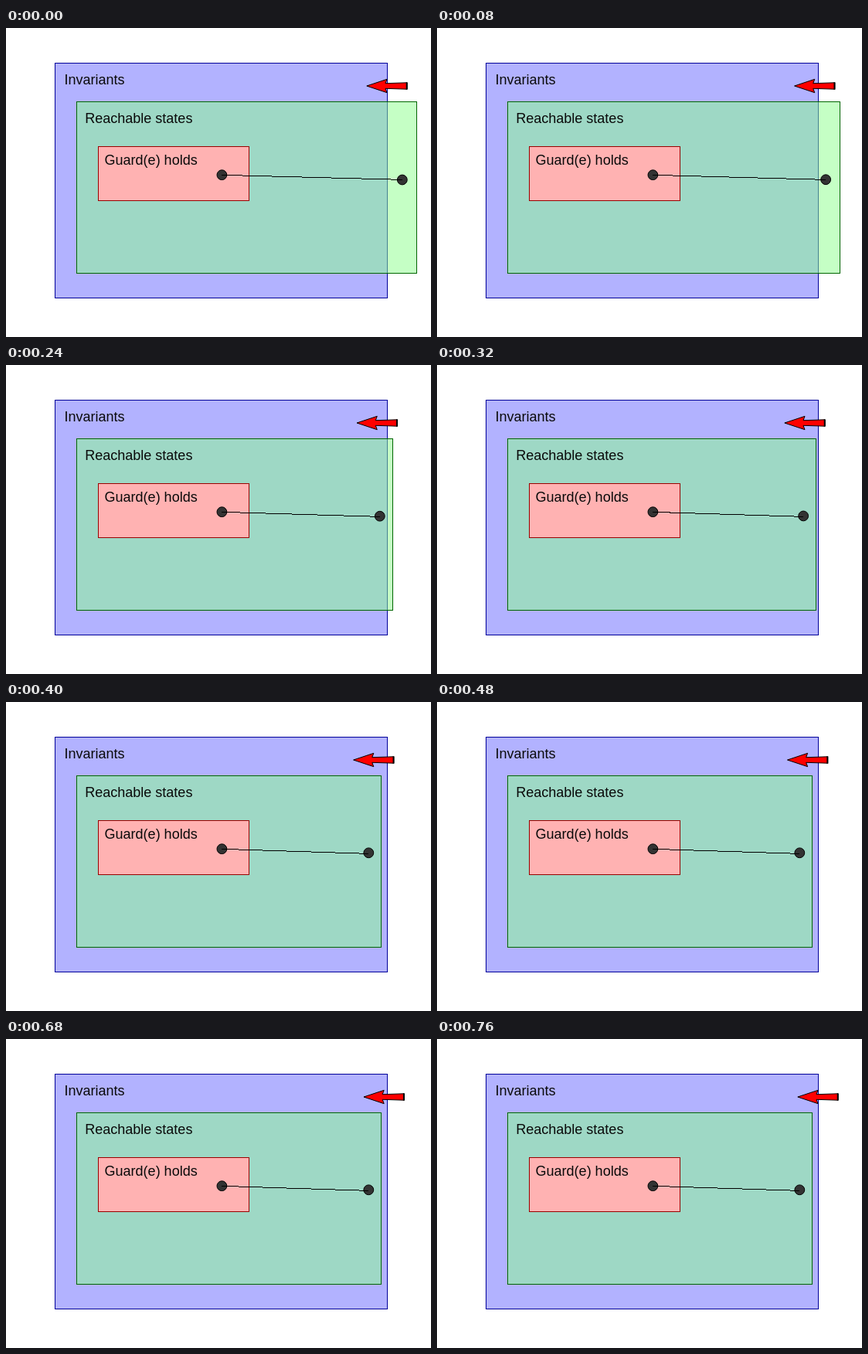
Animation of 550 by 400 pixels, one loop 800 ms. Source, as an HTML page:

```html
<!DOCTYPE html>
<html lang="en">
<head>
<meta charset="utf-8">
<title>Invariants and reachable states</title>
<style>
  html, body { margin: 0; width: 100%; height: 100%; overflow: hidden; background: #fff; }
  svg { display: block; width: 550px; height: 400px; }
  text { font: 18px "Liberation Sans", Arial, sans-serif; fill: #0a0a0a; }
  rect, line { shape-rendering: crispEdges; }
</style>
</head>
<body>
<svg viewBox="0 0 550 400">
  <rect x="63.5" y="45.5" width="430" height="304" fill="#b2b2ff" stroke="#000099"/>
  <text x="75.5" y="73">Invariants</text>

  <rect id="states" x="91.5" y="95.5" height="222" fill="#8cff8c" fill-opacity=".5" stroke="#006600"/>
  <text x="102.3" y="123">Reachable states</text>

  <rect x="119.5" y="153.5" width="195" height="70" fill="#ffb2b2" stroke="#990000"/>
  <text x="127.6" y="177">Guard(e) holds</text>

  <g fill="#333" stroke="#000">
    <circle cx="279.4" cy="190.2" r="6.4"/>
    <circle id="dot" r="6.4"/>
    <line id="link" x1="279" y1="190.3"/>
  </g>

  <g id="arrow" stroke="#000">
    <path d="M.8 0L27-8.7 25-3.3 53-4.2V4.2L25 3.3 27 8.7Z" fill="#f00"/>
    <path d="M52.7-4.7V4.7" stroke-width="2"/>
  </g>
</svg>
<script>
  const STEP = 40, STEPS = 20, TURN = 9;
  const el = id => document.getElementById(id);
  const states = el("states"), dot = el("dot"), link = el("link"), arrow = el("arrow");
  const mix = (a, b, k) => a + (b - a) * k;

  function set(node, attrs) {
    for (const name in attrs) node.setAttribute(name, attrs[name]);
  }

  function draw(now) {
    const i = Math.floor(now / STEP) % STEPS;
    const shrink = Math.min(i / TURN, 1);
    // the arrow pushes in, then returns by the last step
    const push = i <= TURN ? shrink : (STEPS - 1 - i) / (STEPS - 1 - TURN);
    const x = mix(512.8, 469.3, shrink);

    set(states, { width: Math.round(mix(440, 394, shrink)) });
    set(dot, { cx: x, cy: mix(196.5, 195.3, shrink) });
    set(link, { x2: x, y2: 196.4 });
    set(arrow, { transform: `translate(${mix(466, 446.9, push)} 75)` });
  }

  const start = performance.now();
  function tick() {
    draw(performance.now() - start);
    requestAnimationFrame(tick);
  }
  draw(0);
  requestAnimationFrame(tick);
</script>
</body>
</html>
```
